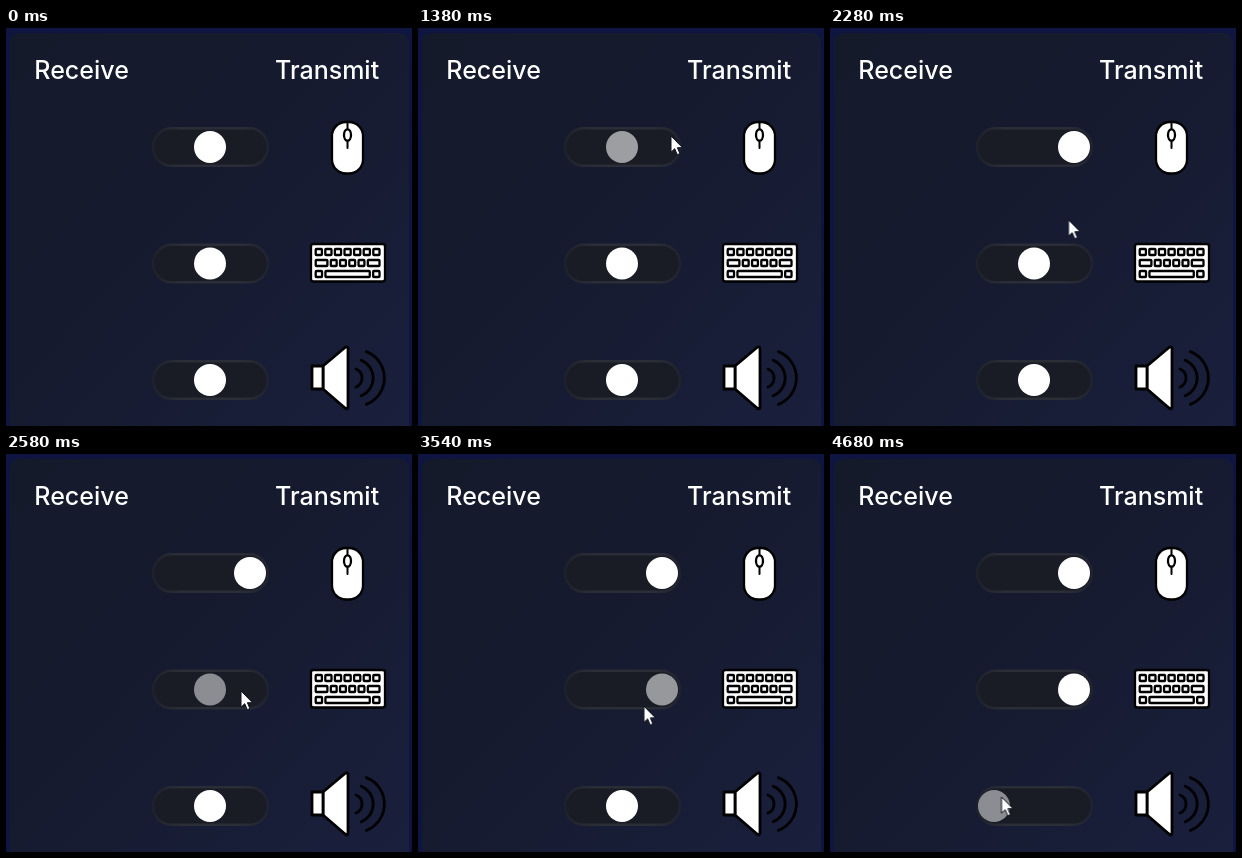
Animation of 406 by 398 pixels, one loop 5.4 s. Source, as an HTML page:

```html
<!DOCTYPE html>
<html lang="en">
<head>
<meta charset="utf-8">
<title>Receive / Transmit</title>
<style>
  html, body { margin: 0; width: 100%; height: 100%; overflow: hidden; background: #0e1540; }
  svg { display: block; width: 406px; height: 398px; }
  text { font: 450 25px Inter, sans-serif; fill: #fff; }
  .ink { fill: #fff; stroke: #000; stroke-width: 2.3; stroke-linejoin: round; }
  .line { fill: none; stroke: #000; stroke-width: 2; stroke-linecap: round; }
  #speaker > * { stroke-width: 2.8; }
  .track { fill: #191c25; stroke: url(#rim); stroke-width: 2.5; }
  .knob { fill: #fff; }
</style>
</head>
<body>
<svg viewBox="0 0 406 398">
  <defs>
    <linearGradient id="panel" x1="0" y1="0" x2="1" y2="1">
      <stop offset="0" stop-color="#151a2b"/>
      <stop offset=".4" stop-color="#151a2e"/>
      <stop offset="1" stop-color="#1a203d"/>
    </linearGradient>
    <linearGradient id="rim" gradientUnits="userSpaceOnUse" x1="146" y1="0" x2="263" y2="0">
      <stop offset="0" stop-color="#1e212b"/>
      <stop offset=".25" stop-color="#2c2e37"/>
      <stop offset=".75" stop-color="#2c2e37"/>
      <stop offset="1" stop-color="#20232f"/>
    </linearGradient>
  </defs>
  <rect x="4" y="5" width="399" height="410" rx="9" fill="url(#panel)"/>
  <text x="28.300" y="51">Receive</text>
  <text x="269" y="51">Transmit</text>

  <g id="mouse">
    <rect class="ink" x="326" y="94" width="31" height="51.500" rx="14"/>
    <path class="line" d="M341.500 94V101M341.500 113V120"/>
    <ellipse class="ink" cx="341.500" cy="107" rx="3.500" ry="5.700"/>
  </g>

  <g id="keyboard">
    <rect class="ink" x="305" y="216" width="74" height="37.500" rx="2.500"/>
  </g>

  <g id="speaker">
    <path class="ink" d="M317 338L339 319.500Q342 318 342 321V378.500Q342 382 339 380L317 361Z"/>
    <rect class="ink" x="306" y="338" width="11" height="23"/>
  </g>

  <g id="sliders"></g>
  <path id="cursor" fill="#fff" stroke="#10131c" stroke-width="1"
    d="M0 0V16.200L3.700 12.700 6.300 18.700 8.900 17.600 6.400 11.700H11.500Z"/>
</svg>
<script>
const LOOP = 5400, STEP = 60, FADE = 200, SLIDE = 300;
const $ = id => document.getElementById(id);
const anims = [];

function add(parent, tag, attrs) {
  const el = document.createElementNS('http://www.w3.org/2000/svg', tag);
  for (const k in attrs) el.setAttribute(k, attrs[k]);
  return parent.appendChild(el);
}

// steps: [time, style value, easing towards the next step]
function play(el, prop, steps) {
  const all = [[0, steps[0][1]], ...steps, [LOOP, steps.at(-1)[1]]];
  const frames = all.map(([t, v, easing = 'linear']) => ({ offset: t / LOOP, [prop]: v, easing }));
  const a = el.animate(frames, { duration: LOOP, iterations: Infinity });
  a.pause();
  anims.push(a);
}

// Key widths in units of one small key; rows are justified to the board.
['1111111', '211112', '171'].forEach((row, r) => {
  const left = 309.7, span = 63.8, gap = 3.4;
  const widths = [...row].map(Number);
  const unit = (span - gap * (widths.length - 1)) / widths.reduce((a, b) => a + b);
  let x = left;
  for (const w of widths) {
    add($('keyboard'), 'rect', { class: 'ink', x, y: 221 + r * 11, width: w * unit, height: 6, rx: .8 });
    x += w * unit + gap;
  }
});

// Sound waves: arcs of growing height and bulge.
for (let i = 0; i < 3; i++) {
  const x = 350 + i * 5.2, half = 9 + i * 8.7, bulge = 6 + i * 6;
  const r = (half * half + bulge * bulge) / (2 * bulge);
  add($('speaker'), 'path', { class: 'line', d: `M${x} ${350 - half}A${r} ${r} 0 0 1 ${x} ${350 + half}` });
}

// Hovering a track dims its knob; a click slides it to one end.
const sliders = [
  { enter: 1270, click: 1500, leave: 1990, side: 1 },
  { enter: 2360, click: 3060, leave: 3520, side: 1 },
  { enter: 3905, click: 4350, side: -1 }
];
sliders.forEach(({ enter, click, leave, side }, i) => {
  const y = 119 + i * 116.5;
  add($('sliders'), 'rect', { class: 'track', x: 147, y: y - 18.7, width: 115, height: 37.5, rx: 18.7 });
  const knob = add($('sliders'), 'circle', { class: 'knob', cx: 204, cy: y, r: 16 });
  const dim = [[enter, 1, 'ease'], [enter + FADE, .5]];
  if (leave) dim.push([leave, .5, 'ease'], [leave + FADE, 1]);
  play(knob, 'opacity', dim);
  play(knob, 'transform', [
    [click, 'translate(0px, 0px)', 'ease'],
    [click + SLIDE, `translate(${side * 40}px, 0px)`]
  ]);
});

// The pointer comes in from the top and rests on each slider in turn.
const path = [
  [720, 350, -22, 'ease-out'], [1380, 253, 108],
  [1880, 253, 108, 'ease-in'], [2280, 238.5, 192, 'ease-out'], [2520, 235, 237],
  [3390, 235, 237, 'ease-in-out'], [3960, 171.5, 343]
];
play($('cursor'), 'transform', path.map(([t, x, y, ease]) => [t, `translate(${x}px, ${y}px)`, ease]));

const start = performance.now();
function tick() {
  const t = (performance.now() - start) % LOOP;
  const held = Math.floor(t / STEP) * STEP;
  for (const a of anims) a.currentTime = held;
  requestAnimationFrame(tick);
}
tick();
</script>
</body>
</html>
```
